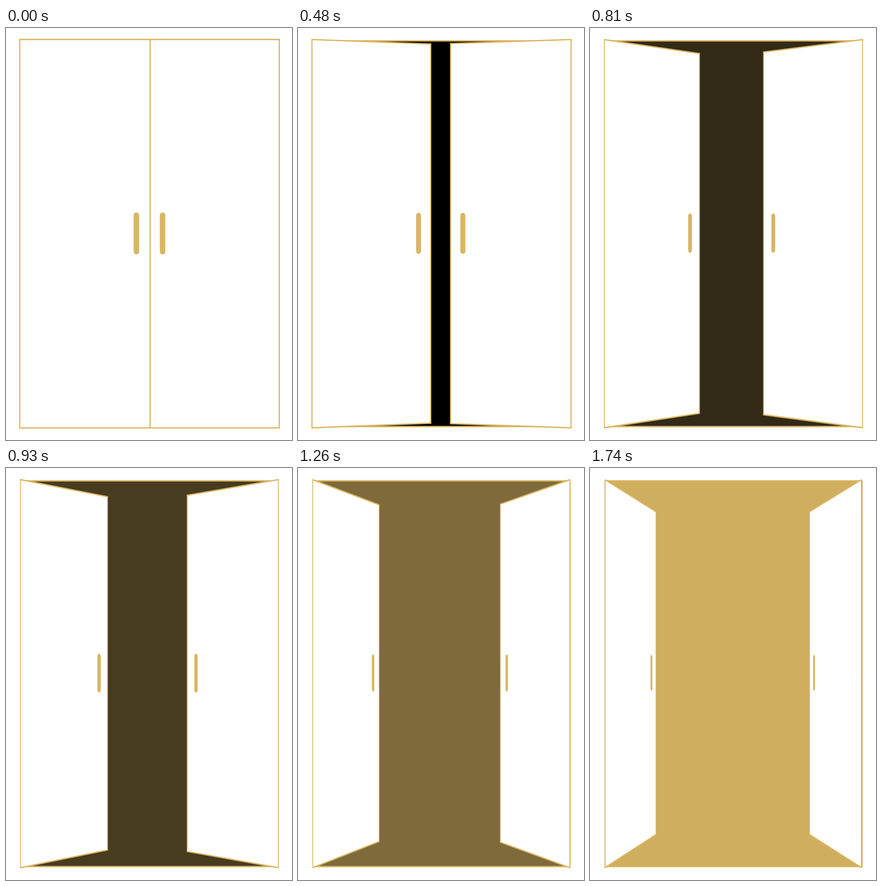
These frames come from a looping animation (624x898 px, 3.83 s). An HTML page with a canvas:

```html
<!DOCTYPE html>
<html lang="en">
<head>
<meta charset="utf-8">
<title>Opening doors</title>
<style>
  html, body { margin: 0; width: 100%; height: 100%; overflow: hidden; background: #fff; }
  canvas { display: block; width: 624px; height: 898px; }
</style>
</head>
<body>
<canvas id="stage" width="624" height="898"></canvas>
<script>
const ctx = document.getElementById('stage').getContext('2d');
const LOOP = 3830, START = 360, END = 1740;
const GOLD = '#d9b662';

// Poses of the doors over time; x positions are in stage pixels.
const times = [360, 630, 810, 1080, 1260, 1740];
const tracks = {
  hingeL: [30, 31, 31.4, 32, 32.4, 33.5],
  edgeL: [309, 265.8, 238.8, 200.6, 177, 143.8],
  topL: [27, 44.5, 55.6, 71, 80.2, 95],
  hingeR: [596.2, 595.2, 594.6, 593.7, 593, 591.6],
  edgeR: [316.4, 353.5, 378.7, 416.2, 441.4, 479.2],
  topR: [27, 42.4, 52.4, 68.4, 78.8, 95],
  sum: [896.5, 896, 895.4, 895.2, 894.5, 894.3],
  knobL: [280.2, 242, 218.3, 184.7, 163.8, 134.1],
  knobR: [345.2, 377.8, 399.8, 432.9, 455.3, 488.8],
  knobW: [11.9, 9.7, 8.2, 6.5, 5.3, 4.1],
  knobH: [91, 88, 86, 82.5, 81, 78.5],
  line: [2.5, 2.3, 2, 1.7, 1.4, 0.9]
};
const closed = {
  hingeL: 30, edgeL: 314.3, topL: 25, hingeR: 596.2, edgeR: 314.3, topR: 25,
  sum: 896.6, knobL: 284.5, knobR: 341.6, knobW: 12, knobH: 91.5, line: 2.6
};

// Monotone cubic through the poses, coming to rest at the last one.
function makeCurve(ys) {
  const n = ys.length;
  const rate = ys.slice(1).map((y, i) => (y - ys[i]) / (times[i + 1] - times[i]));
  const slope = ys.map((_, i) => {
    if (i === 0) return rate[0];
    if (i === n - 1) return 0;
    const a = rate[i - 1], b = rate[i];
    return a * b <= 0 ? 0 : 2 * a * b / (a + b);
  });
  return t => {
    if (t >= END) return ys[n - 1];
    let i = 0;
    while (t >= times[i + 1]) i++;
    const h = times[i + 1] - times[i], u = (t - times[i]) / h, v = 1 - u;
    return v * v * (1 + 2 * u) * ys[i] + u * v * v * h * slope[i] +
           u * u * (3 - 2 * u) * ys[i + 1] - u * u * v * h * slope[i + 1];
  };
}

const curves = Object.entries(tracks).map(([name, ys]) => [name, makeCurve(ys)]);

function poseAt(t) {
  return t < START ? closed : Object.fromEntries(curves.map(([name, f]) => [name, f(t)]));
}

function segment(x1, y1, x2, y2, width) {
  ctx.lineWidth = width;
  ctx.beginPath();
  ctx.moveTo(x1, y1);
  ctx.lineTo(x2, y2);
  ctx.stroke();
}

function drawRoom(t) {
  const k = Math.min(1, Math.max(0, (t - 510) / (END - 510)));
  ctx.fillStyle = `rgb(${[207, 174, 95].map(c => Math.round(c * k)).join()})`;
  ctx.fillRect(33, 28, 560, 841);
  segment(33, 27.9, 593, 27.9, 3);
  segment(33, 868.8, 593, 868.8, 3);
  segment(32.6, 28, 32.6, 868.8, 2);
  segment(593.3, 28, 593.3, 868.8, 3.2);
}

function drawDoor(hinge, edge, top, inset, p) {
  const hingeTop = 25 + inset, hingeEnd = 871.6 - inset, end = p.sum - top;
  ctx.fillStyle = '#fff';
  ctx.beginPath();
  ctx.moveTo(hinge, hingeTop);
  ctx.lineTo(edge, top);
  ctx.lineTo(edge, end);
  ctx.lineTo(hinge, hingeEnd);
  ctx.fill();
  segment(hinge, hingeTop, hinge, hingeEnd, p.line);
  segment(edge, top, edge, end, p.line);
  segment(hinge, hingeTop, edge, top, 2.8);
  segment(hinge, hingeEnd, edge, end, 2.8);
}

function drawKnob(x, p) {
  const r = p.knobW / 2, cap = 6, half = p.knobH / 2 - cap;
  const cy = p.sum / 2 - 0.6;
  ctx.fillStyle = GOLD;
  ctx.beginPath();
  ctx.ellipse(x, cy - half, r, cap, 0, Math.PI, 2 * Math.PI);
  ctx.ellipse(x, cy + half, r, cap, 0, 0, Math.PI);
  ctx.fill();
}

function draw(t) {
  const step = t < 1440 ? 30 : 60;
  const time = Math.floor(t / step) * step;
  const p = poseAt(time);
  const inset = (p.hingeL - 30) * 0.25;
  ctx.fillStyle = '#fff';
  ctx.fillRect(0, 0, 624, 898);
  ctx.strokeStyle = GOLD;
  ctx.lineCap = 'round';
  drawRoom(time);
  drawDoor(p.hingeL, p.edgeL, p.topL, inset, p);
  drawDoor(p.hingeR, p.edgeR, p.topR, inset, p);
  drawKnob(p.knobL, p);
  drawKnob(p.knobR, p);
}

const begin = performance.now();
function tick() {
  draw((performance.now() - begin) % LOOP);
  requestAnimationFrame(tick);
}
tick();
</script>
</body>
</html>
```
